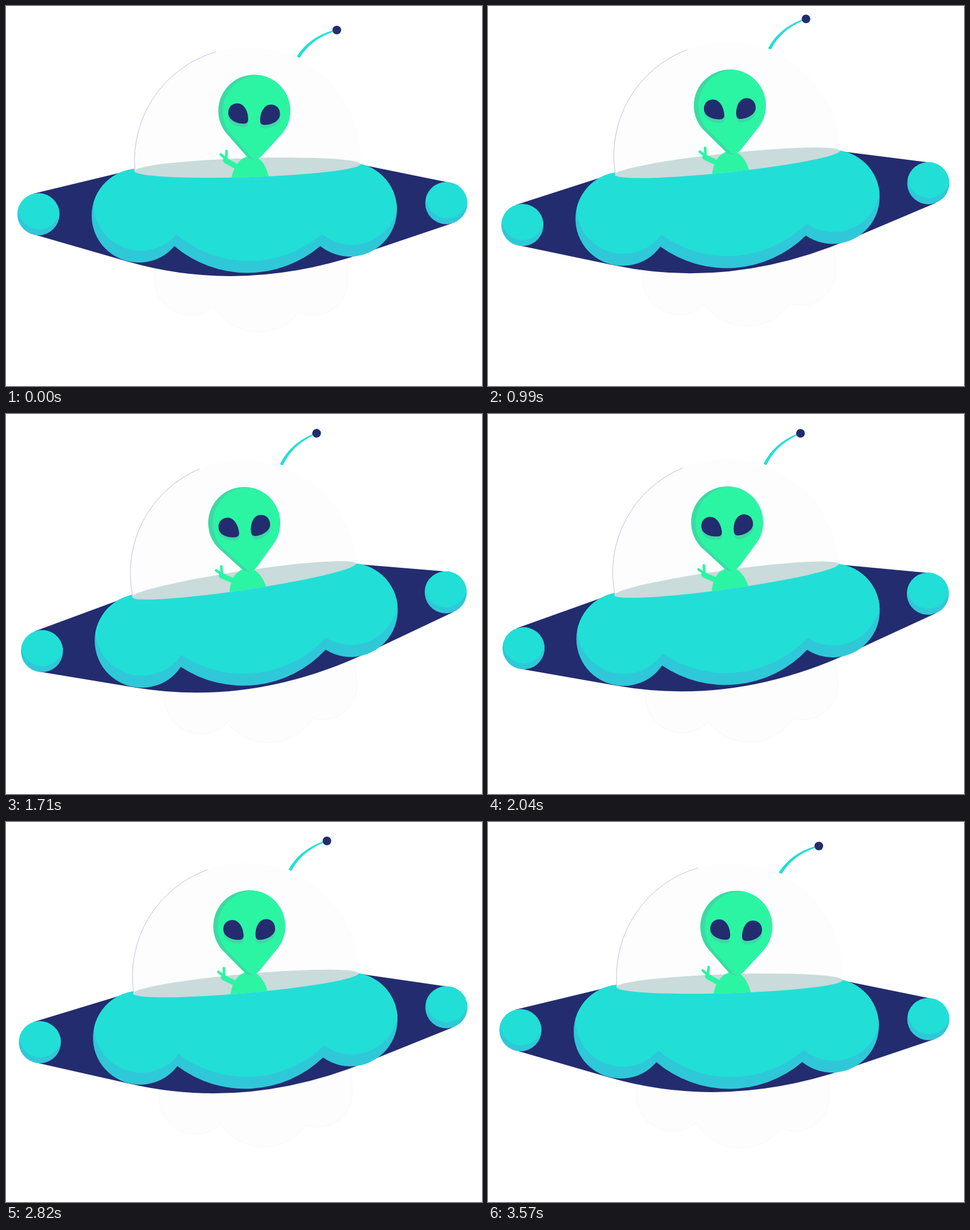
These frames come from a looping animation (800 px wide and 640 px high, 3600 ms). An HTML page with a canvas:

```html
<!DOCTYPE html>
<html lang="en">
<head>
<meta charset="utf-8">
<title>Flying saucer</title>
<style>
  html, body { margin: 0; width: 800px; height: 640px; overflow: hidden; background: #fff; }
  canvas { display: block; }
</style>
</head>
<body>
<canvas id="stage" width="800" height="640"></canvas>
<script>
const ctx = document.getElementById('stage').getContext('2d');
const NAVY = '#232c6f', AQUA = '#21dfd6', AQUA_SHADE = '#2fc8d8';
const GREEN = '#2bf5a3', GREEN_SHADE = '#3cdaa5', RIM = '#c9dbdb', GHOST = '#fdfdfd';
const STEP = 30, STEPS = 120;

// Values at each quarter of the loop, joined linearly.
const TILT = [0, -4, -7, -4, 0];
const LIFT = [0, -10, 10, 0, 0];

function sample(keys, p) {
  const x = p * (keys.length - 1);
  const i = Math.min(Math.floor(x), keys.length - 2);
  return keys[i] + (keys[i + 1] - keys[i]) * (x - i);
}

function fill(path, color) {
  ctx.fillStyle = color;
  ctx.fill(path);
}

function stroke(path, color, width) {
  ctx.strokeStyle = color;
  ctx.lineWidth = width;
  ctx.stroke(path);
}

function disc(x, y, r) {
  const path = new Path2D();
  path.arc(x, y, r, 0, Math.PI * 2);
  return path;
}

function fillShifted(path, dx, dy, color) {
  ctx.save();
  ctx.translate(dx, dy);
  fill(path, color);
  ctx.restore();
}

// Shape in its shade colour, with a shifted lit copy kept inside it.
function shaded(path, dx, dy, lit, shade) {
  fill(path, shade);
  ctx.save();
  ctx.clip(path);
  fillShifted(path, dx, dy, lit);
  ctx.restore();
}

// Arc of a circle between two points, given in drawing order.
function arcBetween(path, cx, cy, r, x1, y1, x2, y2, ccw) {
  path.arc(cx, cy, r, Math.atan2(y1 - cy, x1 - cx), Math.atan2(y2 - cy, x2 - cx), ccw);
}

const dome = disc(406.5, 260, 190.5);
const domeLine = new Path2D();
arcBetween(domeLine, 406.5, 260, 190.5, 216, 276, 353, 76, false);

const cloud = new Path2D();
cloud.moveTo(249, 430);
arcBetween(cloud, 310, 460, 61, 249, 460, 350, 507, true);
arcBetween(cloud, 424.5, 461, 88, 350, 507, 492, 517, true);
arcBetween(cloud, 516, 463, 58, 492, 517, 574, 463, true);
cloud.lineTo(574, 420);

const hull = new Path2D(`M46 316L216 275V279L596 267L748 298
  L750 366L602 416Q396 486 203 430L46 384.5Z`);

const belly = new Path2D();
arcBetween(belly, 223, 353, 79, 216, 274, 283, 404, true);
arcBetween(belly, 405.5, 260.5, 189, 283, 404, 529, 405, true);
arcBetween(belly, 578, 343, 79, 529, 405, 596, 266, true);
belly.lineTo(596, 267);
belly.lineTo(216, 279);
belly.closePath();

const RIM_TILT = -0.031;
const rim = new Path2D();
rim.ellipse(405.8, 272.2, 190.2, 16, RIM_TILT, 0, Math.PI * 2);
const aboveRim = new Path2D('M596 267V0H216V279');
aboveRim.ellipse(405.8, 272.2, 190.2, 16, RIM_TILT, Math.PI, 0, true);

const antenna = new Path2D('M488.7 85Q509 53 550 40.8L550 43.4Q512.5 56 493.3 87.5Z');
const antennaTip = disc(556, 40.5, 7.3);
const balls = [disc(54.5, 350.7, 35.4), disc(740, 332, 35.4)];

const head = new Path2D();
head.moveTo(371, 215);
arcBetween(head, 417.3, 176.3, 60.5, 371, 215, 463.5, 215, false);
head.lineTo(430, 252);
head.quadraticCurveTo(418, 264, 405, 254);
head.closePath();

const leftEye = new Path2D(`M373.5 180C373.5 170 380 164 389 164
  C400 164 407 177 407 191C407 196 404 198.3 400 198.3C388 198.3 373.5 192 373.5 180Z`);
const rightEye = new Path2D();
rightEye.addPath(leftEye, new DOMMatrix([-1, 0, 0, 1, 834, 2]));

const torso = new Path2D('M378.5 294C381 270 394 254 410 253C426 252 438 266 443 294Z');
const arm = new Path2D('M392 273L369 260');
const fingers = new Path2D('M370 258L370.6 244.3M369 257L361 250');

function drawSaucer() {
  fill(cloud, GHOST);
  stroke(cloud, '#f5f5f6', 0.7);
  fill(dome, GHOST);
  stroke(domeLine, '#b5b1df', 0.8);
  fill(antenna, AQUA);
  fill(antennaTip, NAVY);
  fill(hull, NAVY);
  shaded(belly, 3, -20, AQUA, AQUA_SHADE);
  for (const ball of balls) shaded(ball, 1.5, -10, AQUA, AQUA_SHADE);
  fill(rim, RIM);
}

function drawAlien() {
  ctx.save();
  ctx.clip(aboveRim);
  fill(torso, GREEN);
  ctx.lineCap = 'round';
  stroke(arm, GREEN, 9);
  stroke(fingers, GREEN, 4.4);
  ctx.restore();
  shaded(head, 7.5, 1, GREEN, GREEN_SHADE);
  for (const eye of [leftEye, rightEye]) {
    fillShifted(eye, 0, 6, GREEN_SHADE);
    fill(eye, NAVY);
  }
}

function render(ms) {
  const p = (Math.floor(ms / STEP) % STEPS) / (STEPS - 1);
  ctx.fillStyle = '#fff';
  ctx.fillRect(0, 0, 800, 640);
  ctx.save();
  ctx.translate(400, 320 + sample(LIFT, p));
  ctx.rotate(sample(TILT, p) * Math.PI / 180);
  ctx.translate(-400, -320);
  drawSaucer();
  drawAlien();
  ctx.restore();
}

let start;
function tick(now) {
  start ??= now;
  render(Math.max(0, now - start));
  requestAnimationFrame(tick);
}
render(0);
requestAnimationFrame(tick);
</script>
</body>
</html>
```
